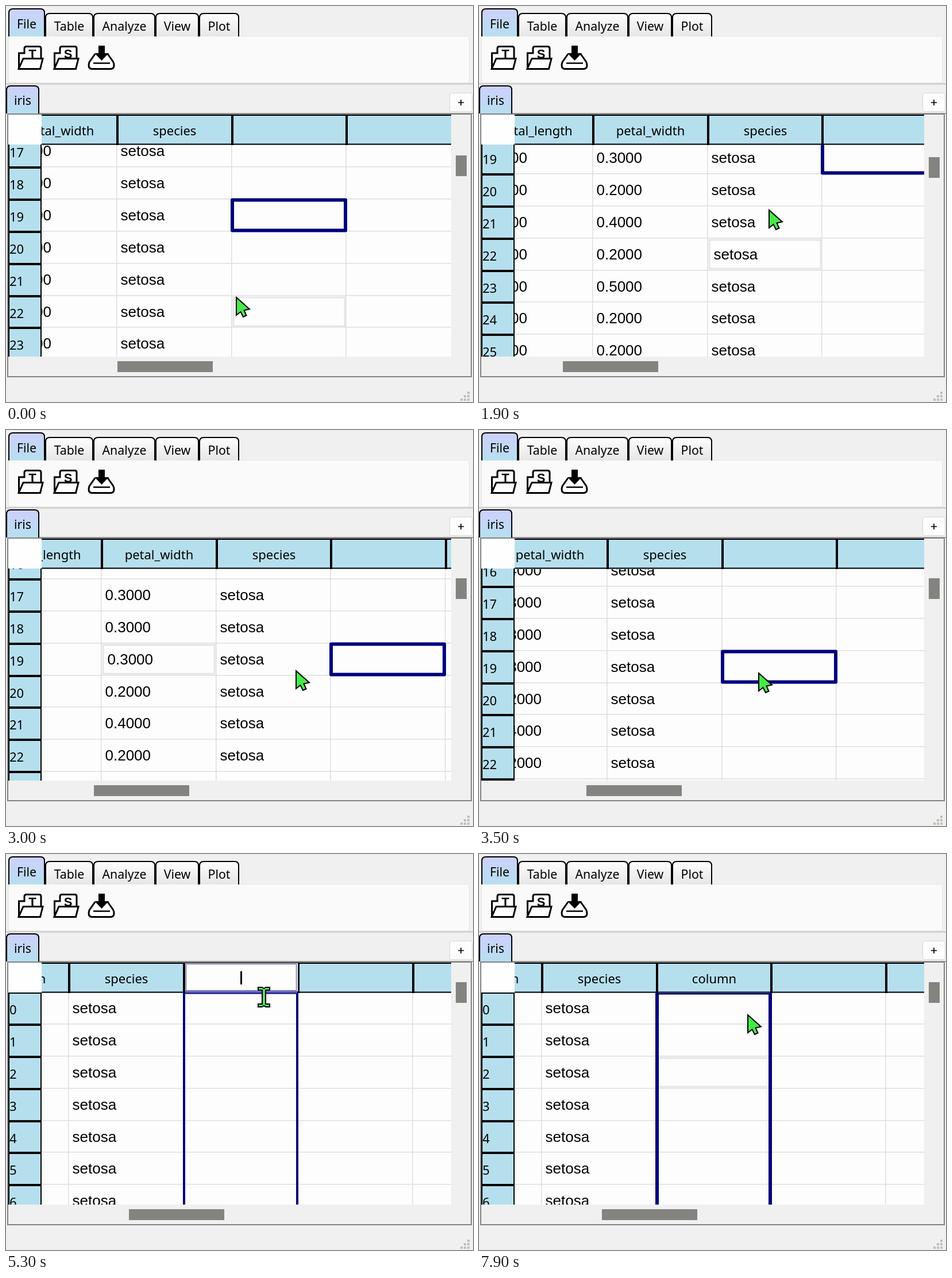
Recreate the animation shown at these times as an HTML page with a canvas. Size 813x689 px, loop 8000 ms.

```html
<!DOCTYPE html>
<html>
<head>
<meta charset="utf-8">
<style>
html, body { margin: 0; width: 813px; height: 689px; overflow: hidden; background: #f0f0f0; }
canvas { display: block; }
</style>
</head>
<body>
<canvas id="stage" width="813" height="689"></canvas>
<script>
const c = document.getElementById('stage').getContext('2d');
const UI = '"Noto Sans", "Open Sans", sans-serif';
const CELL = '26px "Liberation Sans", Arial, sans-serif';
const NAVY = '#00007c', HEAD = '#b6dfee', THUMB = '#838380', PANEL = '#f0f0f0';
const LOOP = 8000, ROW = 55.88, COL = 199.6;
const names = ['sepal_length', 'sepal_width', 'petal_length', 'petal_width', 'species'];
// tenths digits of the two petal columns, one per row
const lengths = '4435474545564125347575079665466';
const widths = '2222243221221124433324252242222';

// time, scroll x, scroll y, pointer x, pointer y, hovered row, hovered column
const keys = [
  [0, 666.4, 965.8, 400, 505, 22, 5],
  [1300, 572.4, 1187.4, 486, 294, 22, 4],
  [2500, 351.2, 944, 522, 412, 19, 3],
  [3500, 636.4, 918, 486, 421, -1, -1],
  [4200, 754.4, 810.2, 382, 527, -1, -1],
  [4800, 750.4, 0, 440, 380, -1, -1],
  [5100, 750.4, 0, 449, 225, -1, -1],
  [5300, 750.4, 0, 449, 249, -1, -1],
  [7200, 750.4, 0, 449, 249, -1, -1],
  [7600, 750.4, 0, 432, 372, 2, 5],
  [7900, 750.4, 0, 467, 278, 2, 5]
];

function pose(t) {
  let i = keys.length - 1;
  while (keys[i][0] > t) i--;
  const a = keys[i], b = keys[i + 1] || a;
  const u = a === b ? 0 : (t - a[0]) / (b[0] - a[0]);
  const [sx, sy, mx, my] = [1, 2, 3, 4].map(k => a[k] + (b[k] - a[k]) * u);
  return { sx, sy, mx: Math.round(mx), my: Math.round(my), hoverRow: a[5], hoverCol: a[6] };
}

function box(x, y, w, h, fill) {
  c.fillStyle = fill;
  c.fillRect(x, y, w, h);
}

function frame(x, y, w, h, color, line) {
  c.strokeStyle = color;
  c.lineWidth = line;
  c.strokeRect(x, y, w, h);
}

function text(s, x, y, font, align = 'left') {
  c.font = font;
  c.textAlign = align;
  c.fillStyle = '#000';
  c.fillText(s, x, y);
}

function fade(y0, y1, from, to) {
  const g = c.createLinearGradient(0, y0, 0, y1);
  g.addColorStop(0, from);
  g.addColorStop(1, to);
  return g;
}

function shape(d, fill, line, color = '#000') {
  const p = new Path2D(d);
  if (fill) { c.fillStyle = fill; c.fill(p); }
  if (line) { c.strokeStyle = color; c.lineWidth = line; c.stroke(p); }
}

function clipped(x, y, w, h, draw) {
  c.save();
  c.beginPath();
  c.rect(x, y, w, h);
  c.clip();
  draw();
  c.restore();
}

function tab(label, x0, x1, y, bottom, base, fill) {
  shape(`M${x0 + 1} ${bottom}V${y + 8}Q${x0 + 1} ${y + 1} ${x0 + 8} ${y + 1}H${x1 - 8}Q${x1 - 1} ${y + 1} ${x1 - 1} ${y + 8}V${bottom}`, fill, 2);
  text(label, (x0 + x1) / 2, base, '21.3px ' + UI, 'center');
}

function folder(x, letter) {
  c.save();
  c.translate(x, 0);
  shape('M2.5 109V82H12V74Q12 70.5 15.5 70.5H37.5Q41 70.5 41 74V90', '#fff', 3);
  text(letter, 26, 91, 'bold 22px "Liberation Sans", sans-serif', 'center');
  shape('M2 109.5L10 91.5H44L39.5 109.5Z', '#fff', 3);
  c.restore();
}

function chrome() {
  box(0, 0, 813, 689, PANEL);
  box(4, 53, 803, 81, '#fafafa');
  frame(4.5, 52.5, 802, 81, '#e4e4e4', 1);
  box(0, 134.5, 813, 2, '#c6c6c2');

  const plain = fade(13, 53, '#fefefe', '#e6e6e6');
  tab('File', 4, 68, 4, 53, 39, fade(4, 53, '#ced0fc', HEAD));
  [['Table', 68, 152], ['Analyze', 152, 260], ['View', 260, 336], ['Plot', 336, 406]]
    .forEach(([s, a, b]) => tab(s, a, b, 12, 53, 43, plain));
  folder(20, 'T');
  folder(82, 'S');
  shape('M155 83.5L145.5 97Q144 99.5 144 103Q144 109.5 150 109.5H182Q188 109.5 188 103Q188 99.5 186.5 97L177 83.5', '#fff', 3);
  shape('M152 99.5H181', null, 2.5);
  shape('M161 69H172V82H179L166.5 95L154 82H161Z', '#000');

  box(58, 186, 755, 2, '#a2a29c');
  tab('iris', 0, 58, 138, 187, 172, fade(138, 187, '#ced0fc', HEAD));
  c.beginPath();
  c.roundRect(772.5, 151.5, 39, 32, 3);
  c.fillStyle = '#fdfdfd';
  c.fill();
  c.strokeStyle = '#d6d6d2';
  c.lineWidth = 1;
  c.stroke();
  shape('M787 168H797M792 163V173', null, 1.7);

  frame(3, 188, 807, 457, '#828282', 2);
  box(4, 189, 805, 455, PANEL);
  for (let i = 0; i < 3; i++)
    for (let j = 0; j <= i; j++) box(803 - 6 * j, 671 + 6 * i, 4, 4, '#bfbfb6');
}

function cellText(row, col) {
  if (col === 4) return 'setosa';
  if (col === 3) return `0.${widths[row]}000`;
  if (col === 2) return `1.${lengths[row]}000`;
  return '';
}

function sheet(p, t) {
  const left = col => Math.round(61 + COL * col - p.sx);
  const top = row => Math.round(241 + ROW * row - p.sy);
  const first = Math.floor(p.sy / ROW), last = first + 7;
  const editing = t >= 5200 && t < 7200, picked = t >= 5000;

  box(62, 241, 713, 369, '#fdfdfd');
  clipped(62, 241, 713, 369, () => {
    for (let row = first; row <= last; row++) {
      box(62, top(row) - 2, 713, 1.5, '#dedee0');
      for (let col = 2; col < 5; col++) {
        const shift = row === p.hoverRow && col === p.hoverCol ? 4 : 0;
        text(cellText(row, col), left(col) + 6.5 + shift, top(row) + 36, CELL);
      }
    }
    for (let col = 1; col < 9; col++) box(left(col) - 1, 241, 1.5, 369, '#dedee2');
    if (p.hoverRow >= 0)
      frame(left(p.hoverCol) + 3, top(p.hoverRow) + 2, 194, 50, '#e5e5ea', 3);
    c.lineJoin = 'round';
    frame(left(5) + 1, top(picked ? 0 : 19) + .5, 197, picked ? 400 : 53, NAVY, editing ? 4 : 6);
    c.lineJoin = 'miter';
  });

  clipped(62, 189, 713, 53, () => {
    box(62, 189, 713, 53, HEAD);
    box(62, 189, 713, 2, '#000');
    box(62, 239.5, 713, 2, '#000');
    for (let col = 1; col < 9; col++) {
      box(left(col) - 1, 189, 4, 53, '#000');
      if (names[col]) text(names[col], left(col) + 100.5, 225, '22px ' + UI, 'center');
    }
    if (editing) headerEditor(left(5), t);
    else if (t >= 7200) text('column', left(5) + 100.5, 225, '22px ' + UI, 'center');
  });

  clipped(4, 241, 58, 369, () => {
    box(4, 241, 58, 369, HEAD);
    for (let row = first; row <= last; row++) {
      box(4, top(row) - 2, 58, 4, '#000');
      text(row, 6, top(row) + 38, '22px ' + UI);
    }
    box(4, 241, 2, 369, '#000');
    box(60, 241, 2, 369, '#000');
  });
  box(4, 189, 58, 52, '#fefefe');

  box(783, Math.round(223.4 + p.sy * .0375), 19, 36, THUMB);
  box(Math.round(36.1 + p.sx * .2376), 618, 166, 19, THUMB);
}

function headerEditor(x, t) {
  box(x + 3, 190, 196, 49, '#fdfdfd');
  frame(x + 4.5, 191.5, 192, 46, '#5858a8', 1.2);
  box(x + 3, 238.5, 195, 3.5, '#5454b4');
  const typed = 'column'.slice(0, Math.max(0, Math.floor((t - 5500) / 200)));
  text(typed, x + 100.5, 225, '22px ' + UI, 'center');
  const end = x + 100.5 + c.measureText(typed).width / 2;
  if (t % 1000 < 600) box(end - 1.5, 204, 3, 23, '#000');
}

function pointer(p, t) {
  c.save();
  c.translate(p.mx, p.my);
  if (t >= 5100 && t < 7300)
    shape('M-10 -17H-3L0 -15L3 -17H10V-12H3V12H10V17H3L0 15L-3 17H-10V12H-3V-12H-10Z', '#55dd66', 2);
  else
    shape('M1 2V33L8.5 27L13 36L18.5 33.5L14.5 24.5L24 22.5Z', '#46ea48', 2);
  c.restore();
}

function draw(now) {
  const t = Math.floor(now % LOOP / 100) * 100;
  const p = pose(t);
  chrome();
  sheet(p, t);
  pointer(p, t);
  requestAnimationFrame(draw);
}
requestAnimationFrame(draw);
</script>
</body>
</html>
```
